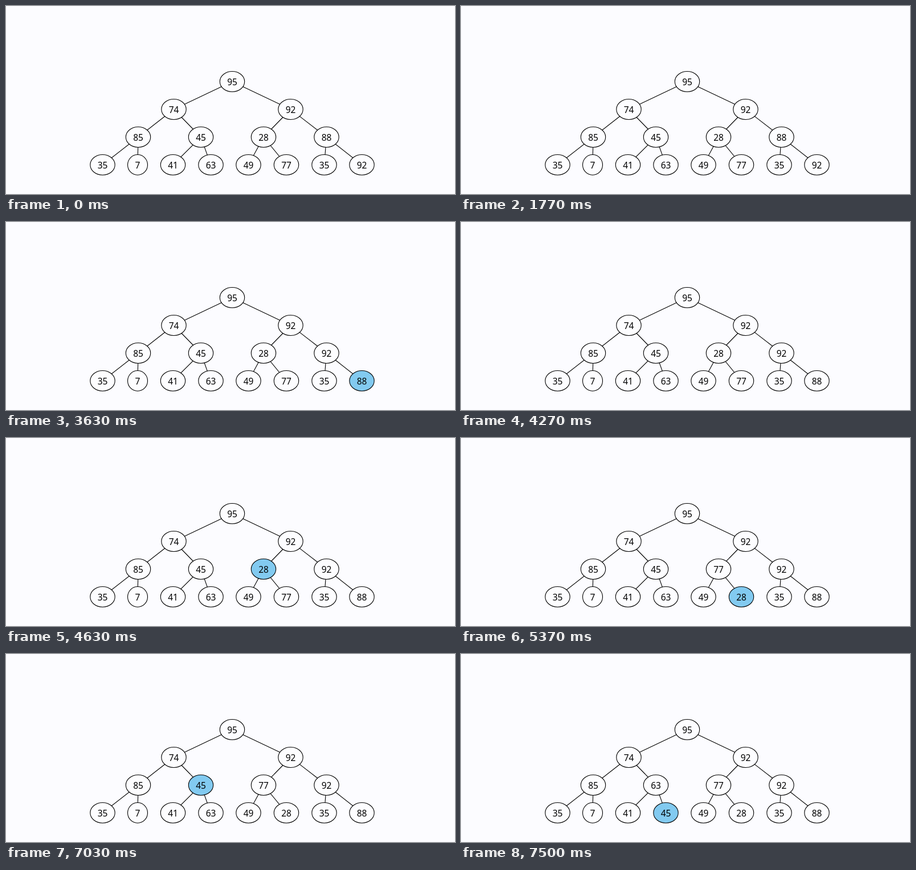
Write an HTML page that moves like this. It is 788 by 332 pixels and loops after 8000 ms.

```html
<!DOCTYPE html>
<html lang="en">
<head>
<meta charset="utf-8">
<title>Building a heap</title>
<style>
  html, body { margin: 0; width: 100%; height: 100%; overflow: hidden; background: #fcfcff; }
  svg { display: block; width: 788px; height: 332px; }
  line, ellipse { stroke: #000; stroke-width: 1.1; }
  text { font: 15.5px "Noto Sans", "Open Sans", sans-serif; fill: #000; text-anchor: middle; }
</style>
</head>
<body>
<svg id="stage" viewBox="0 0 788 332"></svg>
<script>
const LOOP = 8000;
const FADE_IN = 160, FADE_OUT = 370, SWAP = 380;
const PLAIN = [253, 253, 255], ACTIVE = [130, 202, 240];

const values = [95, 74, 92, 85, 45, 28, 88, 35, 7, 41, 63, 49, 77, 35, 92];
const columns = [397, 294.5, 499.5, 232, 342, 452, 562.5,
                 169.5, 231, 293, 359.5, 425.5, 492, 558.5, 624.5];
const slots = columns.map((x, i) => ({ x, y: 133.5 + 49 * Math.floor(Math.log2(i + 1)) }));

// Each step lights up a parent, swaps it with a child, then dims it again.
const steps = [
  { parent: 6, child: 14, lit: 1770, swap: 2010, dim: 3650 },
  { parent: 5, child: 12, lit: 4470, swap: 4700, dim: 6200 },
  { parent: 4, child: 10, lit: 6840, swap: 7120, dim: Infinity }
];

const stage = document.getElementById("stage");

function add(parent, tag, attributes) {
  const element = document.createElementNS("http://www.w3.org/2000/svg", tag);
  for (const name in attributes) element.setAttribute(name, attributes[name]);
  return parent.appendChild(element);
}

slots.slice(1).forEach((slot, i) => {
  const top = slots[i >> 1];
  add(stage, "line", { x1: top.x, y1: top.y, x2: slot.x, y2: slot.y });
});

const nodes = values.map(value => {
  const group = add(stage, "g", {});
  const ellipse = add(group, "ellipse", { rx: value < 10 ? 17.5 : 21.7, ry: 18 });
  add(group, "text", { y: 6.5 }).textContent = value;
  return { group, ellipse };
});

// Active nodes travel above the rest.
steps.forEach(step => stage.append(nodes[step.parent].group));

const progress = (time, start, duration) => Math.min(1, Math.max(0, (time - start) / duration));
const ease = p => (1 - Math.cos(Math.PI * p)) / 2;
const mix = (a, b, p) => a + (b - a) * p;

function place(node, from, to, p, glow) {
  const x = mix(from.x, to.x, p), y = mix(from.y, to.y, p);
  node.group.setAttribute("transform", `translate(${x} ${y})`);
  const color = PLAIN.map((c, i) => Math.round(mix(c, ACTIVE[i], glow)));
  node.ellipse.setAttribute("fill", `rgb(${color})`);
}

function draw(time) {
  nodes.forEach((node, i) => place(node, slots[i], slots[i], 0, 0));
  for (const { parent, child, lit, swap, dim } of steps) {
    const p = ease(progress(time, swap, SWAP));
    const glow = progress(time, lit, FADE_IN) - progress(time, dim, FADE_OUT);
    place(nodes[parent], slots[parent], slots[child], p, glow);
    place(nodes[child], slots[child], slots[parent], p, 0);
  }
}

function tick() {
  draw(performance.now() % LOOP);
  requestAnimationFrame(tick);
}
tick();
</script>
</body>
</html>
```
